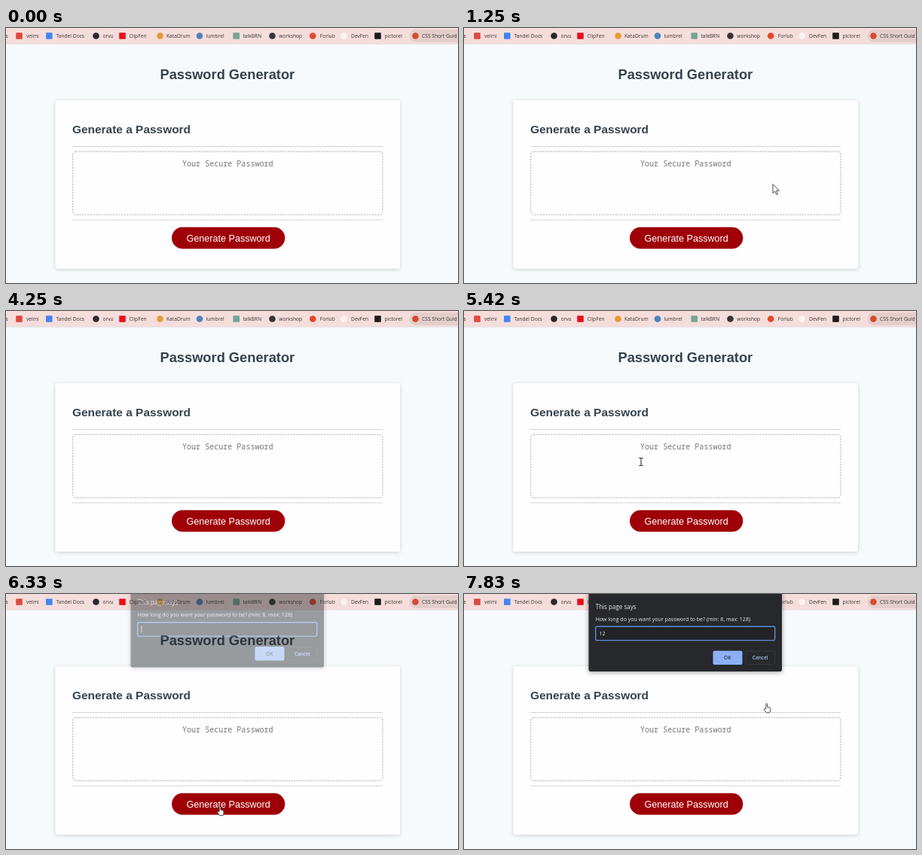
An HTML page for the animation above (8 s loop, 600x339 px).

```html
<!DOCTYPE html>
<html lang="en">
<head>
<meta charset="utf-8">
<title>Password Generator</title>
<style>
  html, body { margin: 0; width: 100%; height: 100%; overflow: hidden; background: #f7fafd; }
  svg { display: block; width: 100vw; height: 100vh; }
  text { white-space: pre; }
  .ui { font-family: "Open Sans", "Noto Sans", sans-serif; }
  .page { font-family: "Liberation Sans", Arial, sans-serif; fill: #36424d; }
  .mono { font-family: "Noto Sans Mono", "DejaVu Sans Mono", monospace; fill: #757575; }
  .card { filter: drop-shadow(0 1px 2.5px rgba(0, 0, 0, .17)); }
  #dialog { filter: drop-shadow(0 1px 3px rgba(0, 0, 0, .4)); }
  #cursor path { fill: #fff; stroke: #222; stroke-width: .8; stroke-linejoin: round; }
  #cursor #ibeam { fill: none; stroke: #333; stroke-width: 1.1; }
</style>
</head>
<body>
<svg viewBox="0 0 600 339">
  <rect width="600" height="339" fill="#f7fafd"/>

  <g id="bookmarks" class="ui" font-size="6.7" fill="#3b3536">
    <rect width="600" height="20.5" fill="#f5dddb"/>
    <rect y="20.5" width="600" height="1" fill="#dfd3d4"/>
    <rect x="535.5" y="2" width="80" height="17" rx="8.5" fill="#e4cecc"/>
    <text x="-.5" y="13">s</text>
  </g>

  <g class="page">
    <text x="204.5" y="68" font-size="18.27" font-weight="700">Password Generator</text>
    <rect class="card" x="65.5" y="96" width="457.5" height="224" rx="3" fill="#fefdff"/>
    <text x="88" y="140" font-size="15.45" font-weight="700">Generate a Password</text>
    <path d="M88 157.5H500M88 255H500" stroke="#d3d3d8"/>
    <rect x="88.7" y="164.3" width="411.3" height="84" rx="4" fill="none" stroke="#b4b4bb" stroke-dasharray="2.4 1.3"/>
    <text class="mono" x="234" y="183.7" font-size="10.05">Your Secure Password</text>
    <rect x="220" y="264.7" width="150.3" height="28.8" rx="14.4" fill="#9f0007"/>
    <text x="239.5" y="283.7" font-size="12.6" style="fill:#fff">Generate Password</text>
  </g>

  <g id="dialog" class="ui" fill="#e8eaed" font-size="7.06">
    <rect x="165.5" y="-20" width="256.5" height="123" rx="2.5" fill="#26282b"/>
    <text x="174.7" y="19.5" font-size="8.05">This page says</text>
    <text x="174.7" y="35.6">How long do you want your password to be? (min: 8, max: 128)</text>
    <rect x="174.7" y="43.2" width="238" height="18.4" rx="1.5" fill="#222427" stroke="#5f8ad8" stroke-width="1.4"/>
    <text id="entry" x="179.5" y="55"></text>
    <rect id="caret" y="47.5" width=".8" height="9.5"/>
    <rect x="330.5" y="75.5" width="39" height="18.5" rx="2" fill="#8cb0f5"/>
    <rect x="374" y="76" width="38.5" height="17.5" rx="2" fill="none" stroke="#383b40" stroke-width=".8"/>
    <g text-anchor="middle" font-size="6.5" font-weight="600">
      <text x="349.7" y="87.1" fill="#26344f">OK</text>
      <text x="393.2" y="87.1" fill="#a3c0f5">Cancel</text>
    </g>
  </g>

  <g id="cursor">
    <path id="arrow" d="M0 0V12L2.8 9.5 4.7 14 6.6 13.2 4.7 8.8H8.3Z"/>
    <path id="ibeam" d="M-2.7-5H2.7M-2.7 5H2.7M0-5V5"/>
    <path id="hand" d="M3 7.5V1.3Q3 .3 3.9 .3T4.8 1.3V4.9L7.6 5.5Q8.9 5.8 8.9 7.1V9.5L7.8 12.6H3.7L.5 8.3Q.2 7.2 1.3 6.9Z"/>
  </g>
</svg>
<script>
const LOOP = 8000, FPS = 12;
const $ = id => document.getElementById(id);

// label, text x, icon centre x, icon colour, round icon?
const bookmarks = [
  ["velmi", 27, 17.5, "#dc4a3f", 0],
  ["Tandel Docs", 66.5, 57.3, "#4285f4", 0],
  ["orvu", 128.5, 119.5, "#29292b", 1],
  ["ClipFen", 163.5, 154.5, "#e8101b", 0],
  ["KataDrum", 213, 204.5, "#e59b35", 1],
  ["lumbrel", 265.5, 257, "#4b83bd", 1],
  ["talkBRN", 314.5, 305.7, "#74a596", 0],
  ["workshop", 362.3, 353.5, "#353536", 1],
  ["Forlub", 416.7, 407.2, "#e2492c", 1],
  ["DevFen", 458, 448.5, "#fcf3f2", 1],
  ["pictorel", 502.5, 493.5, "#1b1b1c", 0],
  ["CSS Short Guid", 552, 543.5, "#d84a30", 1],
];

function addShape(parent, tag, attrs, content = "") {
  const node = document.createElementNS(parent.namespaceURI, tag);
  for (const key in attrs) node.setAttribute(key, attrs[key]);
  node.textContent = content;
  parent.append(node);
}

for (const [label, x, cx, fill, round] of bookmarks) {
  addShape($("bookmarks"), "rect", { x: cx - 4.3, y: 6.2, width: 8.6, height: 8.6, rx: round ? 4.3 : 0.8, fill });
  addShape($("bookmarks"), "text", { x, y: 13 }, label);
}

// time, x, y, pointer shape from that time on
const pointer = [
  [0, 606, 120, ""],
  [250, 606, 120, "arrow"],
  [830, 425, 200, "arrow"],
  [1160, 410, 207.5, "arrow"],
  [3500, 410, 207.5, "arrow"],
  [4000, 592, 60, ""],
  [4600, 592, 70, "arrow"],
  [4900, 430, 180, "ibeam"],
  [5330, 235, 200.5, "ibeam"],
  [5500, 235, 200.5, "ibeam"],
  [5920, 278, 268, "hand"],
  [6083, 280, 282, "hand"],
  [6333, 280, 282, "hand"],
  [6500, 321, 248.5, "hand"],
  [6750, 372, 188, "hand"],
  [7170, 397.8, 145.3, "hand"],
  [LOOP, 397.8, 145.3, "hand"],
];

// time, opacity, vertical offset
const dialogFade = [
  [0, 0, -9], [6250, 0, -9], [6333, .44, -5.5], [6417, .9, -1.5], [6500, 1, 0], [LOOP, 1, 0],
];

function sample(track, t) {
  const i = Math.max(1, track.findIndex(step => step[0] > t));
  const a = track[i - 1], b = track[i];
  const p = (t - a[0]) / (b[0] - a[0]);
  return [a[1] + (b[1] - a[1]) * p, a[2] + (b[2] - a[2]) * p, a[3]];
}

function render(now) {
  const t = Math.floor((now % LOOP + 4) * FPS / 1000) * 1000 / FPS % LOOP;

  const [x, y, shape] = sample(pointer, t);
  $("cursor").setAttribute("transform", `translate(${x} ${y})`);
  for (const id of ["arrow", "ibeam", "hand"]) $(id).style.display = id === shape ? "" : "none";

  const [opacity, offset] = sample(dialogFade, t);
  $("dialog").setAttribute("opacity", opacity);
  $("dialog").setAttribute("transform", `translate(0 ${offset})`);

  const typed = t >= 7160 ? 2 : t >= 6995 ? 1 : 0;
  const blinkStart = [6330, 6995, 7160][typed];
  $("entry").textContent = "12".slice(0, typed);
  $("caret").setAttribute("x", 179.6 + typed * 4.05);
  $("caret").style.display = (t - blinkStart) % 1000 < 500 ? "" : "none";
}

const start = performance.now();
function tick() {
  render(performance.now() - start);
  requestAnimationFrame(tick);
}
tick();
</script>
</body>
</html>
```
